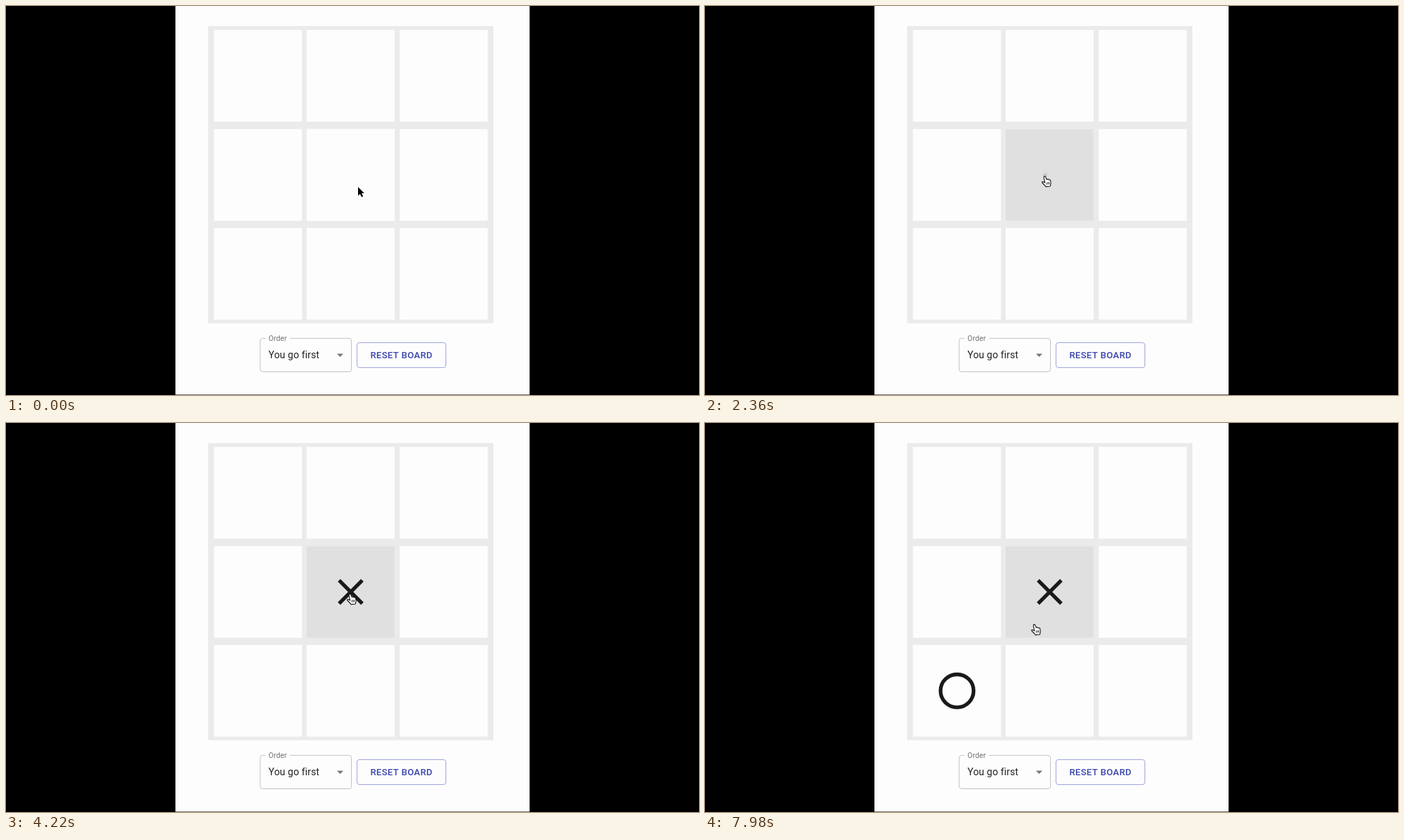
Write an HTML page with a canvas that moves like this. It is 998 px wide and 561 px high and loops after 8000 ms.

```html
<!DOCTYPE html>
<html lang="en">
<head>
<meta charset="utf-8">
<title>Tic-tac-toe</title>
<style>
  html, body { margin: 0; width: 100%; height: 100%; overflow: hidden; background: #000; }
  canvas { display: block; }
</style>
</head>
<body>
<canvas id="stage" width="998" height="561"></canvas>
<script>
const ctx = document.getElementById('stage').getContext('2d');
const LOOP = 8000;
const COLS = [299.5, 433, 567], ROWS = [34.5, 177.5, 320];
const CELL_W = 126.7, CELL_H = 132.3;
const INK = '#1a1a1a', PAPER = '#fdfdfe';

const HOVER = 770, HOVER_TIME = 590;
const PRESS = 2220, RELEASE = 2470, RIPPLE_TIME = 1300, RIPPLE_RADIUS = 98;
const REPLY = 4940;

// Pointer hotspot: time, x, y
const POINTER = [
  [0, 507, 261], [400, 507, 261], [1120, 487, 240], [1260, 487, 240],
  [1840, 489, 245], [2360, 489, 245], [2820, 490, 245], [3760, 490, 245],
  [4220, 495, 246], [4920, 496, 247], [5720, 508, 251], [7000, 508, 251],
  [7720, 499, 268], [7820, 499, 268], [7980, 474, 290], [LOOP, 474, 290]
];

const clamp = v => Math.min(1, Math.max(0, v));
const mix = (a, b, k) => a + (b - a) * k;

// cubic-bezier(.4, 0, .2, 1), solved by bisection
function ease(x) {
  x = clamp(x);
  let lo = 0, hi = 1, s = x;
  for (let i = 0; i < 18; i++) {
    s = (lo + hi) / 2;
    const u = 1 - s;
    if (1.2 * u * u * s + 0.6 * u * s * s + s * s * s < x) lo = s; else hi = s;
  }
  return s * s * (3 - 2 * s);
}

function pointerAt(t) {
  const i = POINTER.findIndex(p => p[0] > t);
  const [t0, x0, y0] = POINTER[i - 1], [t1, x1, y1] = POINTER[i];
  const k = (t - t0) / (t1 - t0), s = k * k * (3 - 2 * k);
  return [mix(x0, x1, s), mix(y0, y1, s)];
}

function rect(x, y, w, h, color) {
  ctx.fillStyle = color;
  ctx.fillRect(x, y, w, h);
}

function outline(x, y, w, h, color) {
  ctx.beginPath();
  ctx.roundRect(x, y, w, h, 3.5);
  ctx.strokeStyle = color;
  ctx.lineWidth = 1;
  ctx.stroke();
}

function text(str, x, y, size, weight, color, spacing) {
  ctx.font = `${weight} ${size}px Roboto, sans-serif`;
  ctx.letterSpacing = spacing + 'px';
  ctx.fillStyle = color;
  ctx.fillText(str, x, y);
}

function drawBoard(t) {
  rect(291, 29, 411, 428.5, '#ebebeb');
  for (const x of COLS) for (const y of ROWS) rect(x, y, CELL_W, CELL_H, PAPER);
  const shade = Math.round(mix(253, 224, ease((t - HOVER) / HOVER_TIME)));
  rect(COLS[1], ROWS[1], CELL_W, CELL_H, `rgb(${shade},${shade},${shade})`);
}

function drawCross(x, y) {
  const r = 16.7;
  ctx.beginPath();
  ctx.moveTo(x - r, y - r);
  ctx.lineTo(x + r, y + r);
  ctx.moveTo(x + r, y - r);
  ctx.lineTo(x - r, y + r);
  ctx.strokeStyle = INK;
  ctx.lineWidth = 5.3;
  ctx.stroke();
}

function drawRing(x, y) {
  ctx.beginPath();
  ctx.arc(x, y, 23.8, 0, 7);
  ctx.strokeStyle = INK;
  ctx.lineWidth = 5.3;
  ctx.stroke();
}

function drawRipple(t) {
  const fade = 1 - ease((t - RELEASE) / RIPPLE_TIME);
  if (t < PRESS || fade <= 0) return;
  const grow = ease((t - PRESS) / RIPPLE_TIME);
  ctx.save();
  ctx.beginPath();
  ctx.rect(COLS[1], ROWS[1], CELL_W, CELL_H);
  ctx.clip();
  ctx.beginPath();
  ctx.arc(490, 243.5, RIPPLE_RADIUS * grow, 0, 7);
  ctx.fillStyle = `rgba(0,0,0,${0.87 * mix(0.1, 0.3, grow) * fade})`;
  ctx.fill();
  ctx.restore();
}

function drawControls() {
  outline(366, 479.3, 131.5, 48.2, '#c2c2c4');
  rect(373.5, 477, 35.5, 5, PAPER);
  text('Order', 378, 482.6, 10.6, 400, '#707070', 0.1);
  text('You go first', 378, 508.2, 14.1, 400, '#212121', 0.13);
  ctx.beginPath();
  ctx.moveTo(476.6, 501.4);
  ctx.lineTo(485.9, 501.4);
  ctx.lineTo(481.25, 506.1);
  ctx.fillStyle = '#757575';
  ctx.fill();
  outline(505.5, 485.5, 128, 36, '#9ea5da');
  text('RESET BOARD', 524.7, 508.1, 13.2, 500, '#3a45ab', 0.38);
}

const ARROW = new Path2D('M0 0V12.6L2.9 9.9L5 14.6L7.2 13.6L5.2 9.1H9Z');
const HAND = new Path2D('M-.9 1.2C-.4 .1 .9 .2 1.4 1.3L3 5.1C3.7 4.3 4.7 4.5 5 5.3' +
  'C5.8 4.6 6.7 5 6.9 5.9C7.8 5.5 8.5 6 8.6 7L9 10.2C9.1 12 8.3 13 8.2 15L1.8 15.6' +
  'C1 13.5 -1.6 12.1 -3.5 9.7C-4 8.7 -2.9 7.9 -1.9 8.6L.5 9.7L-1 3Z');
const KNUCKLES = new Path2D('M2.9 9.3L3.2 12.6M4.7 9.1L5 12.4M6.4 8.9L6.7 12.2');

function drawPointer(t) {
  const [x, y] = pointerAt(t);
  ctx.save();
  ctx.translate(Math.round(x), Math.round(y));
  ctx.lineJoin = 'round';
  if (t < HOVER) {
    ctx.strokeStyle = '#fff';
    ctx.lineWidth = 1.6;
    ctx.stroke(ARROW);
    ctx.fillStyle = '#000';
    ctx.fill(ARROW);
  } else {
    ctx.fillStyle = '#fff';
    ctx.fill(HAND);
    ctx.strokeStyle = '#111';
    ctx.lineWidth = 1.1;
    ctx.stroke(HAND);
    ctx.lineWidth = 0.8;
    ctx.stroke(KNUCKLES);
  }
  ctx.restore();
}

function draw(t) {
  rect(0, 0, 998, 561, '#000');
  rect(244, 0, 510, 560, PAPER);
  rect(244, 560, 510, 1, '#777');
  drawBoard(t);
  if (t >= RELEASE) drawCross(496.4, 243.6);
  if (t >= REPLY) drawRing(363, 386.3);
  drawRipple(t);
  drawControls();
  drawPointer(t);
}

const start = performance.now();
function tick() {
  draw((performance.now() - start) % LOOP);
  requestAnimationFrame(tick);
}
tick();
</script>
</body>
</html>
```
